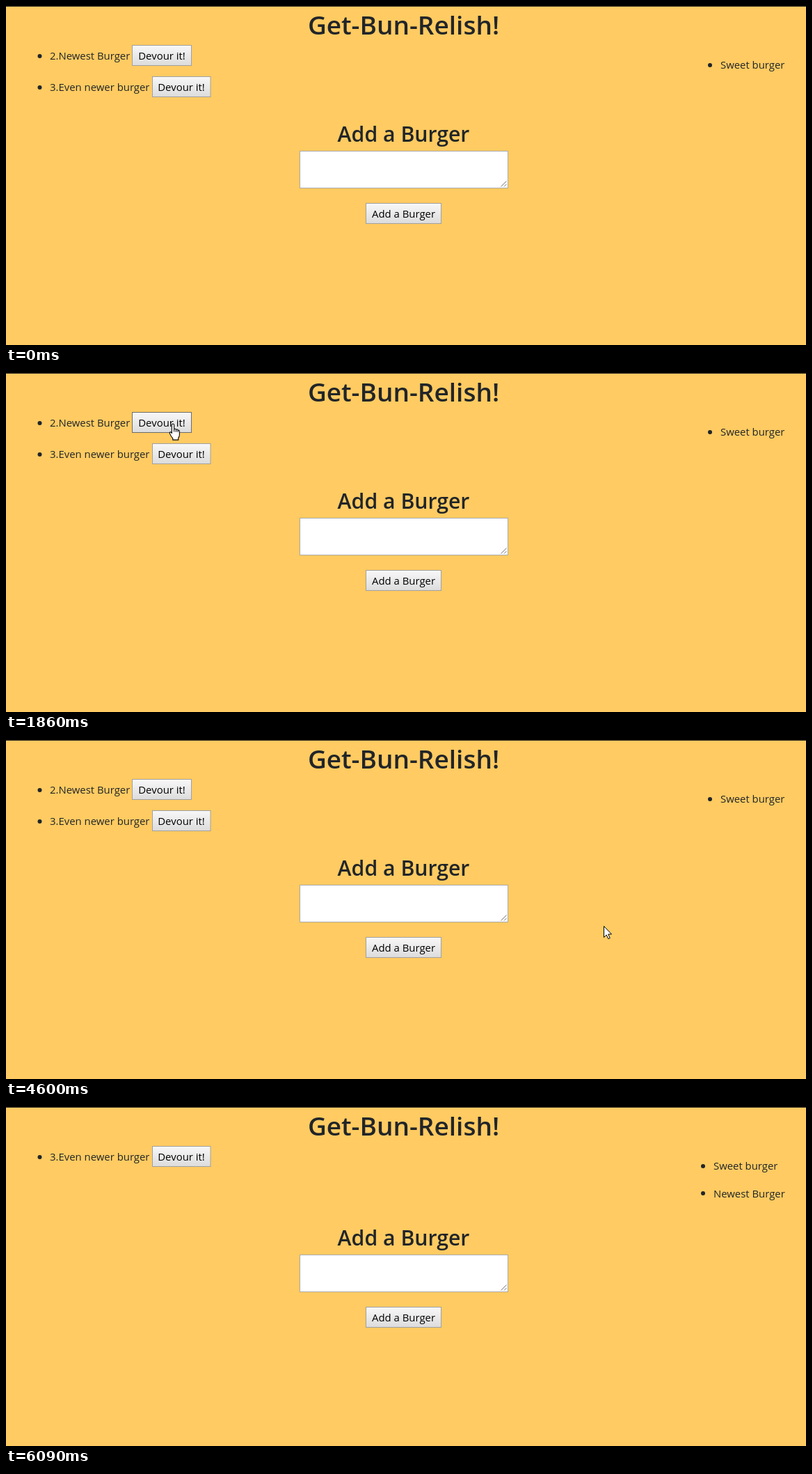
Animation of 1150 by 487 pixels, one loop 6750 ms. Source, as an HTML page:

```html
<!DOCTYPE html>
<html lang="en">
<head>
<meta charset="utf-8">
<title>Burger list</title>
<style>
html, body { margin: 0; height: 100%; overflow: hidden; background: #ffcb62; }
svg { display: block; }
text { font: 14.9px "Open Sans", "Noto Sans", sans-serif; fill: #212529; }
.head { font-weight: 600; text-anchor: middle; }
.btn rect { fill: url(#up); stroke: #a0a0a0; }
.btn text { fill: #000; text-anchor: middle; }
.btn.hover rect { stroke: #6c6c6c; }
.btn.down rect { fill: url(#down); }
.dot { fill: #212529; }
#pointer path { fill: #fff; stroke: #000; stroke-linejoin: round; }
#pointer #beam { fill: none; }
</style>
</head>
<body>
<svg width="1150" height="487" viewBox="0 0 1150 487">
  <defs>
    <linearGradient id="up" x2="0" y2="1"><stop stop-color="#f8f8f8"/><stop offset="1" stop-color="#dcdcdc"/></linearGradient>
    <linearGradient id="down" x2="0" y2="1"><stop stop-color="#d8d8d8"/><stop offset="1" stop-color="#eee"/></linearGradient>
  </defs>
  <rect width="1150" height="1" fill="#2e2a22"/>
  <text class="head" x="571.5" y="41" style="font-size:37px">Get-Bun-Relish!</text>

  <g id="newest">
    <circle class="dot" cx="48.5" cy="72" r="3"/>
    <text x="63" y="77">2.Newest Burger</text>
    <g class="btn" id="devour"><rect x="181.5" y="56.5" width="85" height="29"/><text x="224" y="77">Devour it!</text></g>
  </g>
  <g id="newer">
    <circle class="dot" cx="48.5" cy="117" r="3"/>
    <text x="63" y="122">3.Even newer burger</text>
    <g class="btn"><rect x="210.5" y="101.5" width="83.5" height="29"/><text x="252" y="122">Devour it!</text></g>
  </g>

  <g id="sweet">
    <circle class="dot" cx="1012" cy="85" r="3"/>
    <text x="1027" y="90">Sweet burger</text>
  </g>
  <g id="eaten">
    <circle class="dot" cx="1002" cy="124" r="3"/>
    <text x="1017" y="129.5">Newest Burger</text>
  </g>

  <g id="form">
    <text class="head" x="571.5" y="195" style="font-size:30.2px">Add a Burger</text>
    <rect x="422.5" y="208.5" width="299" height="53" fill="#fff" stroke="#a9a9a9"/>
    <path d="M711.5 259.5l8-8M716 259.5l3.5-3.5" stroke="#777" fill="none"/>
    <g class="btn"><rect x="517.5" y="283.5" width="108" height="29"/><text x="571.5" y="304">Add a Burger</text></g>
  </g>

  <g id="pointer">
    <path id="arrow" d="M.5.5V16.5L4.2 13 6.8 18.6 9.2 17.6 6.7 12H11.5Z"/>
    <path id="beam" d="M-3-7.5h2.2L0-7l.8-.5H3M0-7V7M-3 7.5h2.2L0 7l.8.5H3"/>
    <path id="hand" transform="translate(-1 -.5) scale(1.1)" d="M-1.5 12V2a1.5 1.5 0 0 1 3 0V7.5Q3.2 6.3 4 8 5.8 7 6.4 9 8.5 8.2 8.5 10.5V15Q8.3 17.5 7 19V21.5H-.2V19.5Q-2.5 17-4 13.5-4.8 11.2-3.2 11.2-2.3 11.3-1.5 12.8ZM1.5 7.5V11M4 8.3V11.2M6.4 9.2V11.4"/>
  </g>
</svg>
<script>
const LOOP = 6750, PRESS = 2000, RELEASE = 2140, RELOAD = 4750;
// start ms, end ms, steps, x, y, ease-out power
const moves = [
  [260, 380, 5, 573, 235, 1],
  [670, 790, 5, 439, 192, 1],
  [820, 1180, 12, 323, 104, 1.6],
  [1460, 1860, 10, 241, 73, 1.6],
  [2460, 2630, 6, 734, 199, 1.3],
  [3010, 3240, 6, 852, 264, 1.3],
  [4600, 4900, 10, 897, 283, 1.6],
  [5390, 5540, 6, 995, 403, 1.2],
  [5850, 6090, 9, 1083, 490, 1]
];
const $ = id => document.getElementById(id);
const show = (id, on) => $(id).setAttribute("display", on ? "inline" : "none");
const shift = (id, x, y) => $(id).setAttribute("transform", `translate(${x} ${y})`);
const within = (x, y, l, t, r, b) => x >= l && x <= r && y >= t && y <= b;

function pointerAt(t) {
  let x = 1080, y = 492;
  for (const [start, end, steps, toX, toY, power] of moves) {
    if (t < start) break;
    const step = Math.floor((t - start) / (end - start) * (steps - 1)) + 1;
    const p = 1 - (1 - Math.min(1, step / steps)) ** power;
    x += (toX - x) * p;
    y += (toY - y) * p;
  }
  return [Math.round(x), Math.round(y)];
}

function draw(t) {
  const [x, y] = pointerAt(t), done = t >= RELOAD;
  const onButton = !done && within(x, y, 181, 56, 267, 86);
  const onField = within(x, y, 422, 208, 722, 262);
  show("pointer", t >= 260 && t < 6090);
  shift("pointer", x, y);
  show("hand", onButton);
  show("beam", onField);
  show("arrow", !onButton && !onField);
  $("devour").classList.toggle("hover", onButton);
  $("devour").classList.toggle("down", t >= PRESS && t < RELEASE);
  show("newest", !done);
  show("eaten", done);
  shift("newer", 0, done ? -45 : 0);
  shift("sweet", done ? -10 : 0, 0);
  shift("form", 0, done ? 4 : 0);
}

function frame() {
  draw(performance.now() % LOOP);
  requestAnimationFrame(frame);
}
frame();
</script>
</body>
</html>
```
